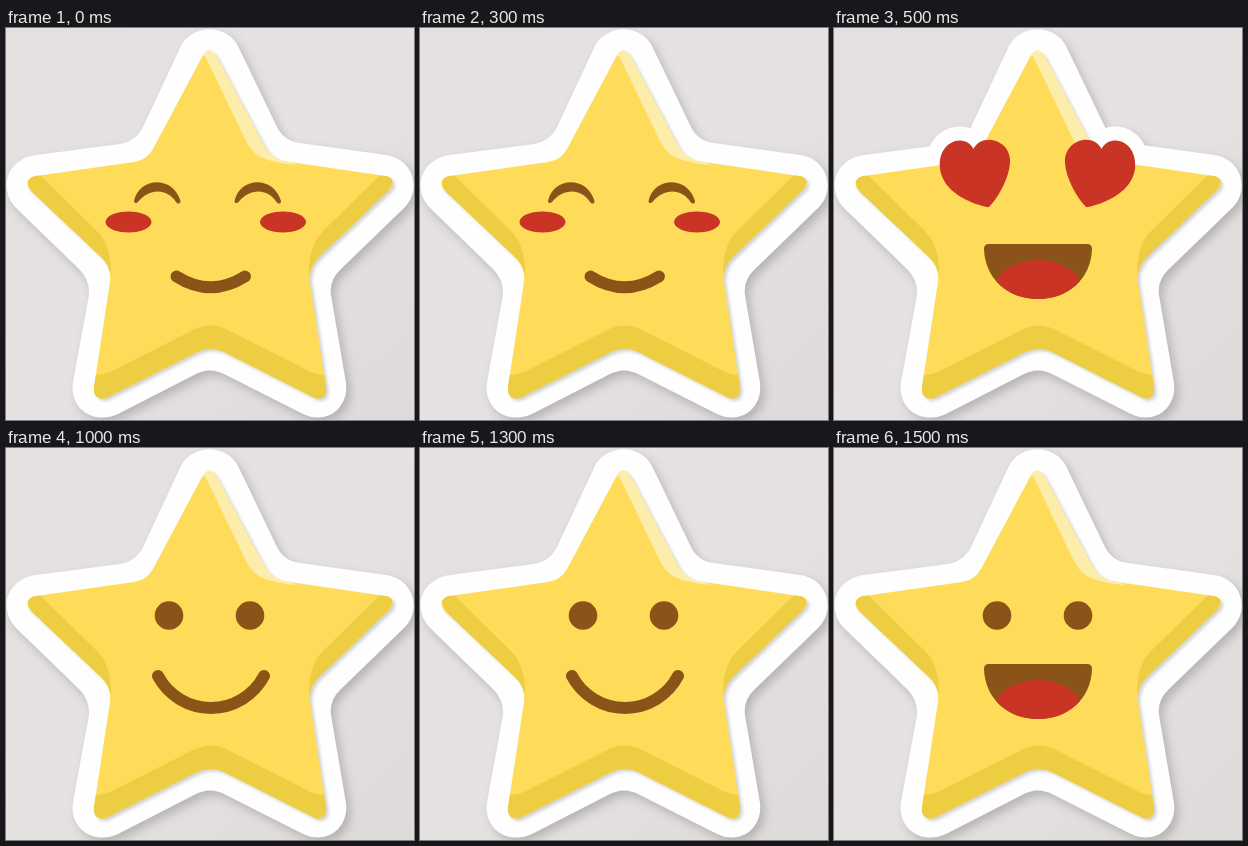
Animation of 408 by 392 pixels, one loop 2000 ms. Source, as an HTML page:

```html
<!DOCTYPE html>
<html lang="en">
<head>
<meta charset="utf-8">
<title>Star sticker</title>
<style>
  html, body { margin: 0; width: 100%; height: 100%; overflow: hidden; background: #e2dfde; }
  svg { display: block; width: 408px; height: 392px; }
  [data-on] { opacity: 0; }
</style>
</head>
<body>
<svg viewBox="0 0 408 392">
  <defs>
    <linearGradient id="wall" x1="0" y1="0" x2="1" y2="1">
      <stop offset="0" stop-color="#e3e0df"/>
      <stop offset=".5" stop-color="#e5e2e1"/>
      <stop offset="1" stop-color="#dedad9"/>
    </linearGradient>
    <filter id="lift" x="-10%" y="-10%" width="120%" height="120%" color-interpolation-filters="sRGB">
      <feDropShadow dx="4" dy="5" stdDeviation="5" flood-color="#4a4444" flood-opacity=".28"/>
    </filter>
    <filter id="soft" x="-10%" y="-10%" width="120%" height="120%" color-interpolation-filters="sRGB">
      <feDropShadow dx="2.5" dy="2.5" stdDeviation="1.8" flood-color="#555" flood-opacity=".25"/>
    </filter>
    <path id="star" d="M196 29 Q203 16 211 29 L256 114 Q263 129 277 133
      L379 148 C387 149 389 155 384 161 L314 228 Q302 239 304 254
      L320 359 C321 369 315 373 307 369 L220 325 Q205 317 189 325
      L102 369 C93 373 87 369 88 359 L104 254 Q106 239 95 229
      L24 162 C19 156 22 149 30 148 L128 134 Q141 132 147 121 Z"/>
    <clipPath id="inStar"><use href="#star"/></clipPath>
    <path id="heart" d="M153 179 C134 175 109 163 106 141 C104 124 114 113 125 112.500
      C132 112 137 116 139.500 121 C143 114 150 111 158 112 C170 114 177 124 176 135
      C175 150 165 168 156 178 Q155 179.500 153 179 Z"/>
    <path id="wink" d="M128 173 C133 149 167 147 174.500 173 C174.500 176 172 176.500 170 174
      C161 160 143 160 132 174 C130 176 128 175 128 173 Z"/>
    <path id="grin" d="M155 216 H253 Q258 216 258 221 C257 251 234 271 204 271
      C174 271 151 251 150 221 Q150 216 155 216 Z"/>
    <clipPath id="inGrin"><use href="#grin"/></clipPath>
  </defs>

  <rect width="408" height="392" fill="url(#wall)"/>

  <g filter="url(#lift)" fill="#fefefe">
    <path d="M174 20 C185 -5 222 -5 233 20 L270 97 Q277 113 294 115
      L380 127 C408 131 417 163 397 181 L335 241 Q323 252 325 267
      L340 355 C343 381 320 397 297 386 L220 347 Q204 338 188 347
      L112 386 C88 397 63 381 67 354 L83 267 Q84 252 73 241
      L11 181 C-9 161 1 131 30 127 L114 116 Q131 113 138 97 Z"/>
    <g data-on="1" stroke="#fefefe" stroke-width="28" stroke-linejoin="round">
      <use href="#heart"/>
      <use href="#heart" transform="matrix(-1 0 0 1 407 0)"/>
    </g>
  </g>

  <use href="#star" fill="#fedc59" filter="url(#soft)"/>
  <g clip-path="url(#inStar)">
    <path fill="#fdedab" d="M196 29 Q202 18 212 24 L270 120 L290 137 Q260 134 250 126 Q244 121 239 111 L199 28 Z"/>
    <g fill="#edcd42">
      <path id="fold" d="M15 140 L35 148 L91 203 Q105 217 105 245 L60 240 Z"/>
      <use href="#fold" transform="matrix(-1 0 0 1 408 0)"/>
      <path d="M80 347 H91 Q97 347 104 344 L187 302 Q205 293 222 302 L305 344 Q312 347 318 347 H330 V380 H80 Z"/>
    </g>
  </g>

  <g fill="#8a5318">
    <g data-on="0">
      <use href="#wink"/>
      <use href="#wink" x="100.500"/>
      <g fill="#c93425">
        <ellipse cx="122.500" cy="194" rx="23" ry="10.500"/>
        <ellipse cx="277" cy="194" rx="23" ry="10.500"/>
      </g>
      <path d="M170.500 248.500 Q204.500 270 239 248.500" fill="none" stroke="#8a5318" stroke-width="12" stroke-linecap="round"/>
    </g>
    <g data-on="1" fill="#c93425">
      <use href="#heart"/>
      <use href="#heart" transform="matrix(-1 0 0 1 407 0)"/>
    </g>
    <g data-on="2 3">
      <circle cx="163" cy="167.500" r="14.300"/>
      <circle cx="244" cy="167.500" r="14.300"/>
    </g>
    <path data-on="2" d="M152 228 A60 60 0 0 0 258 228" fill="none" stroke="#8a5318" stroke-width="12" stroke-linecap="round"/>
    <g data-on="1 3">
      <use href="#grin"/>
      <ellipse cx="204" cy="264" rx="45" ry="32" fill="#c93425" clip-path="url(#inGrin)"/>
    </g>
  </g>
</svg>
<script>
  // Each part lists the quarters of the loop in which it shows.
  const LOOP = 2000, STEPS = 4;
  for (const part of document.querySelectorAll('[data-on]')) {
    const on = part.dataset.on.split(' ').map(Number);
    const keys = Array.from({ length: STEPS + 1 }, (_, i) => ({
      opacity: on.includes(i % STEPS) ? 1 : 0,
      offset: i / STEPS,
      easing: 'step-end'
    }));
    part.animate(keys, { duration: LOOP, iterations: Infinity }).startTime = 0;
  }
</script>
</body>
</html>
```
